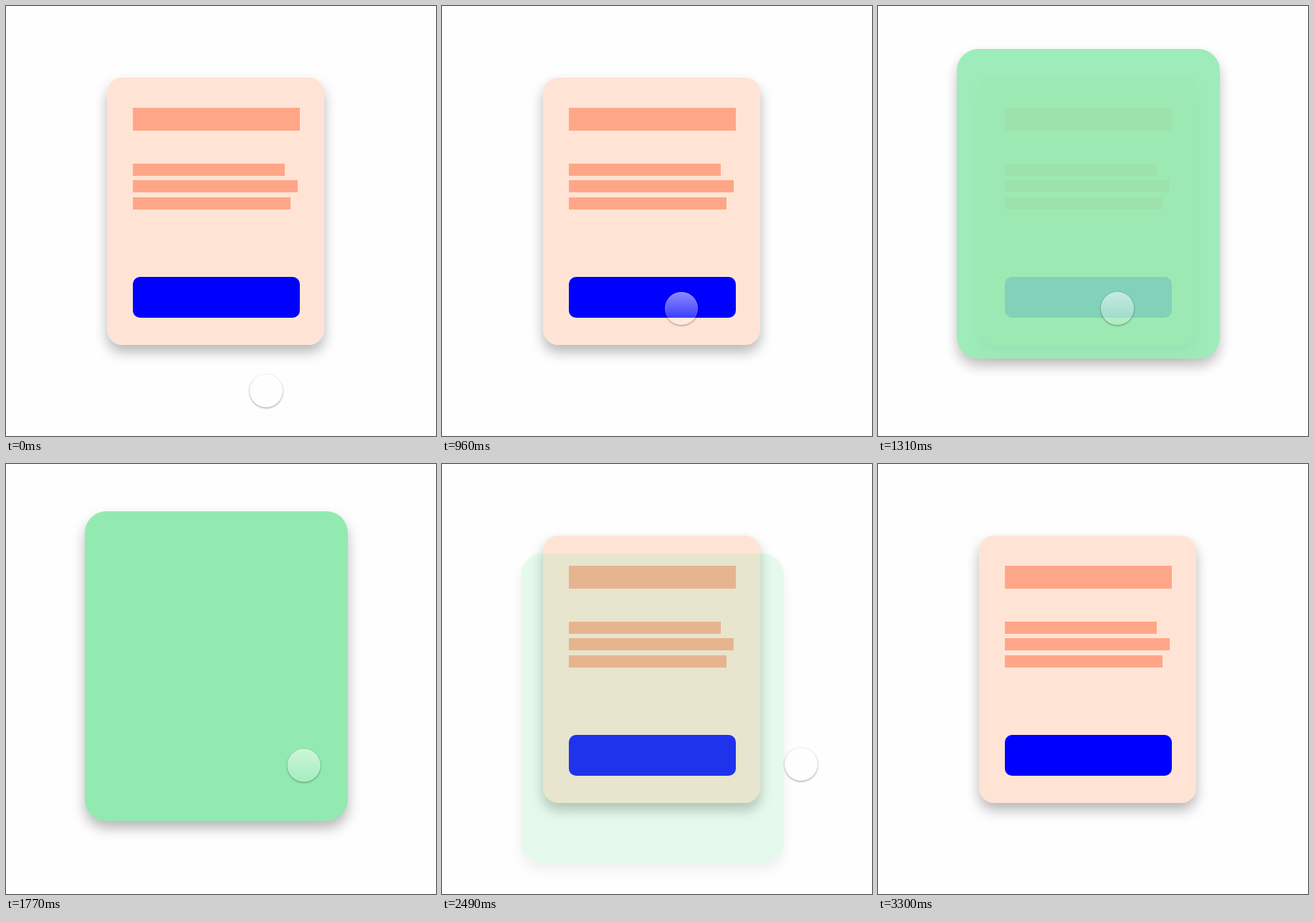
Animation, 600 px wide and 600 px high, one loop 3.71 s. Source, as an HTML page:

```html
<!DOCTYPE html>
<html lang="en">
<head>
<meta charset="utf-8">
<title>Card tap</title>
<style>
  html, body { margin: 0; width: 100%; height: 100%; overflow: hidden; background: #fefefe; }
  #stage { position: relative; width: 600px; height: 600px; overflow: hidden; }
  #stage div { position: absolute; }
  .card { box-shadow: 0 10px 18px rgba(0, 0, 0, .28); }
  #base { left: 141px; top: 100px; width: 303px; height: 373px; border-radius: 21px; background: #ffe4d5; }
  #modal { left: 110px; top: 66px; width: 367px; height: 432px; border-radius: 30px; background: #92eab1; }
  .bar { left: 36px; height: 17px; background: #ffa688; }
  #button { left: 36px; top: 278px; width: 233px; height: 57px; border-radius: 10px; background: #00f; }
  #cursor {
    left: -23px; top: -23px; width: 46px; height: 46px; border-radius: 50%;
    background: linear-gradient(rgba(255, 255, 255, .55), rgba(255, 255, 255, .16));
    box-shadow: 0 1px 3px rgba(0, 0, 0, .4), inset 0 0 0 1px rgba(255, 255, 255, .12);
  }
</style>
</head>
<body>
<div id="stage">
  <div id="base" class="card">
    <div class="bar" style="top:42px;width:233px;height:32px"></div>
    <div class="bar" style="top:120px;width:212px"></div>
    <div class="bar" style="top:143px;width:230px"></div>
    <div class="bar" style="top:167px;width:220px"></div>
    <div id="button"></div>
  </div>
  <div id="modal" class="card"></div>
  <div id="cursor"></div>
</div>
<script>
const LOOP = 3710, OPEN = 1190, CLOSE = 2388, GONE = 2580, CURSOR_OUT = 3300;
const PRESS = 110;
const modal = document.getElementById('modal');
const cursor = document.getElementById('cursor');

const clamp = v => Math.min(1, Math.max(0, v));
const progress = (t, from, to) => clamp((t - from) / (to - from));
const easeOut = p => 1 - (1 - p) ** 2;
const glide = p => { const s = easeOut(p); return s * s * (3 - 2 * s); };
const pressedAt = (t, down) => t >= down && t < down + PRESS;

function drawCursor(t) {
  let x = 363, y = 537;
  const moveTo = (tx, ty, from, to) => {
    const p = glide(progress(t, from, to));
    x += (tx - x) * p;
    y += (ty - y) * p;
  };
  moveTo(334, 422, 520, 960);
  moveTo(501, 419, 1622, 2140);
  moveTo(573, 628, 2790, CURSOR_OUT);
  const scale = pressedAt(t, OPEN - PRESS) || pressedAt(t, 2320) ? .95 : 1;
  cursor.style.transform = `translate(${x}px, ${y}px) scale(${scale})`;
  cursor.style.opacity = t < CURSOR_OUT ? 1 : 0;
}

// Springs up while fading in, then drops away while fading out.
function drawModal(t) {
  const s = Math.max(0, t - OPEN) / 1000;
  const bounce = 45 * Math.exp(-11 * s) * Math.cos(17.4 * s);
  const leave = easeOut(progress(t, CLOSE, GONE));
  modal.style.transform = `translateY(${bounce + 75 * leave}px)`;
  modal.style.opacity = t < OPEN ? 0 : clamp(.3 + 4.9 * s) * (1 - leave);
}

const start = performance.now();
function loop() {
  const t = (performance.now() - start) % LOOP;
  drawCursor(t);
  drawModal(t);
  requestAnimationFrame(loop);
}
loop();
</script>
</body>
</html>
```
